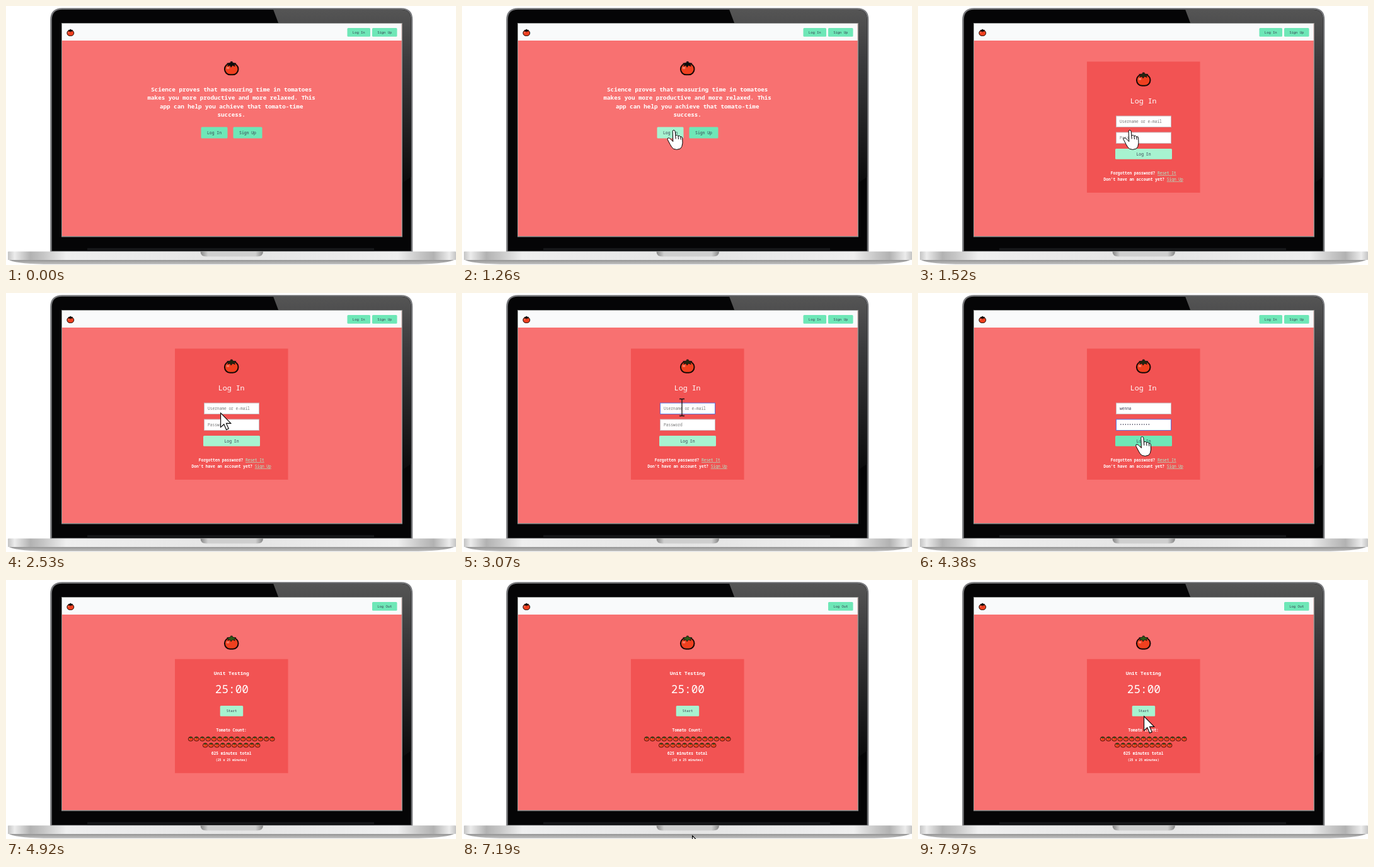
Recreate the animation shown at these times as an HTML page. Size 714 by 412 pixels, loop 8 s.

```html
<!DOCTYPE html>
<html lang="en">
<head>
<meta charset="utf-8">
<title>Tomato timer</title>
<style>
html, body { margin: 0; width: 100%; height: 100%; overflow: hidden; background: #fff; }
svg { display: block; width: 714px; height: 412px; }
text { font-family: "Noto Sans Mono", "DejaVu Sans Mono", monospace; white-space: pre; }
</style>
</head>
<body>
<svg id="stage" viewBox="0 0 714 412"></svg>
<script>
const MINT = '#6ee7b7', PALE = '#a7f3d0', PANEL = '#f25353', MID = 357.7;

const text = (s, x, y, size, fill = '#fff', more = '') =>
  `<text x="${x}" y="${y}" font-size="${size}" fill="${fill}" ${more}>${s}</text>`;
const centered = (s, x, y, size, fill, bold) =>
  text(s, x, y, size, fill, `text-anchor="middle" font-weight="${bold ? 600 : 400}"`);
const rect = (x, y, w, h, fill, more = '') =>
  `<rect x="${x}" y="${y}" width="${w}" height="${h}" fill="${fill}" ${more}/>`;
const button = (s, x, y, w, h, size, fill, id = '') =>
  rect(x, y, w, h, fill, `rx="1.5" ${id && `id="${id}"`}`) +
  centered(s, x + w / 2, y + h / 2 + size * .36, size, '#374151');
const field = (id, y, hint) =>
  rect(314.5, y, 87, 17.5, '#fff', `id="${id}Box" stroke="#c9b4b8"`) +
  text(hint, 320, y + 11, 6.2, '#777', `id="${id}"`);
const group = (id, body) => `<g id="${id}">${body}</g>`;
const gradient = (id, stops, down) =>
  `<linearGradient id="${id}" ${down ? 'x2="0" y2="1"' : ''}>` +
  stops.map(([at, color]) => `<stop offset="${at}" stop-color="${color}"/>`).join('') + '</linearGradient>';

const tomato = (x, y, scale, leaf = '#0c0c0c') => `
  <g transform="translate(${x} ${y}) scale(${scale})">
    <rect x="-10.8" y="-7.4" width="21.6" height="17.6" rx="8.6" fill="#f0401f" stroke="#140805" stroke-width="2"/>
    <ellipse cx="-5.6" cy="-.4" rx="2.4" ry="1.9" fill="#f77a66"/>
    <path d="M-1.2 -10.5H1.4L1.8 -8.4L7.4 -7.8L4.6 -5.6L5.6 -3L1.6 -4.6L-.6 -1.6L-2.4 -4.6L-6 -3.2L-4.6 -5.8L-7 -7.8L-1.6 -8.4Z"
      fill="${leaf}" stroke="#111" stroke-width=".8"/>
  </g>`;
const tomatoRow = (n, y) =>
  Array.from({ length: n }, (_, i) => tomato(MID + (i - (n - 1) / 2) * 9.24, y, .35, '#2f5a16')).join('');

const laptop = `
  <defs>
    ${gradient('rim', [[0, '#77787b'], [.5, '#6c6d70'], [1, '#77787b']])}
    ${gradient('gloss', [[0, '#555'], [.3, '#3b3b3d'], [1, '#0b0b0c']], true)}
    ${gradient('metal', [[0, '#c4c4c4'], [.015, '#ececec'], [.05, '#b2b2b2'], [.08, '#c6c6c6'], [.13, '#efefef'],
      [.5, '#e4e4e4'], [.87, '#efefef'], [.92, '#c6c6c6'], [.95, '#b2b2b2'], [.985, '#ececec'], [1, '#c4c4c4']])}
    ${gradient('under', [[0, '#8d8d8d'], [1, '#c4c4c4']], true)}
    ${gradient('notch', [[0, '#858585'], [.12, '#cfcfcf'], [.88, '#cfcfcf'], [1, '#858585']])}
  </defs>
  <path d="M71.5 391V22Q71.5 4.5 89 4.5H627Q644 4.5 644 22V391Z" fill="#050506" stroke="url(#rim)" stroke-width="2.6"/>
  <path d="M424 5.5L432.5 28H628V282L642.5 272V22Q642.5 6 627 6Z" fill="url(#gloss)"/>
  ${rect(129, 385, 455, 5, '#151618')}
  <path d="M3 403Q12 409.5 60 411H654Q702 409.5 713 403Z" fill="url(#under)"/>
  ${rect(3, 390.5, 711, 13.5, 'url(#metal)', 'rx="1"')}
  <path d="M308.5 390.5H408Q408 398.5 398 398.5H318Q308.5 398.5 308.5 390.5" fill="url(#notch)"/>
  ${rect(88, 27, 541, 340.5, '#8f9391')}
  ${rect(89, 28, 538.6, 338, '#f87171')}
  ${rect(89, 28, 538.6, 27, '#f9fafb')}
  ${tomato(102.3, 42.3, .5)}`;

const pitch = [
  'Science proves that measuring time in tomatoes',
  'makes you more productive and more relaxed. This',
  'app can help you achieve that tomato-time',
  'success.'];

const link = s => `<tspan fill="${PALE}" font-weight="400" text-decoration="underline">${s}</tspan>`;

const landing =
  tomato(MID, 99, 1) +
  pitch.map((s, i) => centered(s, MID, 135.8 + i * 13.5, 9.26, '#fff', true)).join('') +
  button('Log In', 309.5, 192.5, 42, 18, 6.4, MINT, 'enter') +
  button('Sign Up', 360.5, 192.5, 46, 18, 6.4, MINT);

const login =
  rect(268, 88.5, 179.5, 208.5, PANEL) +
  tomato(MID, 116.5, 1, '#24260f') +
  centered('Log In', MID, 155, 11.6) +
  field('user', 175, '') + field('pass', 201, '') +
  button('Log In', 313, 227, 90, 16.7, 6.4, PALE, 'submit') +
  centered('Forgotten password? ' + link('Reset It'), MID, 268, 6.2, '#fff', true) +
  centered("Don't have an account yet? " + link('Sign Up'), MID, 278, 6.2, '#fff', true);

const timer =
  tomato(MID, 99.5, 1, '#2f5a16') +
  rect(268, 125.8, 179.5, 181.4, PANEL) +
  centered('Unit Testing', MID, 151.2, 7.75, '#fff', true) +
  centered('25:00', 358.4, 180, 17.7) +
  button('Start', 339.7, 200, 36.5, 16.7, 5.5, PALE) +
  centered('Tomato Count:', MID, 241.2, 6.2, '#fff', true) +
  tomatoRow(15, 252.6) + tomatoRow(10, 262.6) +
  centered('625 minutes total', MID, 277.8, 6.25, '#fff', true) +
  centered('(25 x 25 minutes)', MID, 288, 4.9, '#fff', true);

const pointers =
  '<circle id="ring" r="17" fill="#fff" fill-opacity=".3" stroke="#fff" stroke-opacity=".6" stroke-width="2"/>' +
  group('arrow', '<path d="M.6 .8V23.6L5.8 18.8L9.6 27.4L13.2 25.8L9.5 17.4H16.8Z" fill="#fff" stroke="#000" stroke-width="1.1"/>') +
  group('beam', '<path d="M-4 -13.5H-1Q0 -13.5 0 -12.5Q0 -13.5 1 -13.5H4M0 -12.5V12.5M-4 13.5H-1Q0 13.5 0 12.5Q0 13.5 1 13.5H4" fill="none" stroke="#111" stroke-width="1.3"/>') +
  group('hand', `<path d="M-2.2 2.4Q-2 .5 -.4 .5T1.8 2.6L2.4 9Q5.6 7.4 6.6 9.8Q9.4 8.6 10.4 11Q13 10.4 13.3 13L13.6 21Q13 27.5 10 30Q4 32.6 -.5 30.4Q-4 28 -6 23.5L-10.2 15.6Q-11 12.4 -8 12.8L-5.6 14.6L-1.6 18.6Z
    M2.4 9L2.8 14.5M6.6 9.8L7 15M10.4 11L10.8 15.6" fill="#fff" stroke="#000" stroke-width="1" stroke-linejoin="round"/>`);

const $ = id => document.getElementById(id);
$('stage').innerHTML = laptop +
  group('guestNav',
    button('Log In', 541.5, 35, 36.5, 13.7, 5.5, MINT) +
    button('Sign Up', 581, 35, 39.5, 13.7, 5.5, MINT)) +
  group('memberNav', button('Log Out', 581, 35, 39.5, 13.7, 5.5, MINT)) +
  group('landing', landing) + group('login', login) + group('timer', timer) + pointers;

// start time, pointer, hot spot
const moves = [
  [0], [660, 'hand', 336.4, 197],
  [2530, 'arrow', 340, 190], [2600, 'beam', 343, 186], [2670, 'beam', 346, 184], [2800, 'beam', 349, 182],
  [3820, 'arrow', 347, 192], [3890, 'arrow', 346, 200], [3960, 'arrow', 348, 207],
  [4030, 'arrow', 350, 214], [4100, 'arrow', 352, 221],
  [4170, 'hand', 355, 225], [4240, 'hand', 356, 228], [4920]];
const clicks = [[1190, 335, 197], [3000, 349, 182], [4310, 356, 228]];

const show = (id, on) => $(id).setAttribute('display', on ? 'inline' : 'none');
const place = (id, x, y) => $(id).setAttribute('transform', `translate(${x} ${y})`);
const fill = (id, color) => $(id).setAttribute('fill', color);

function pointerAt(t) {
  if (t < 7190) return moves.findLast(m => m[0] <= t);
  const p = Math.min(1, Math.floor((t - 7190) / 70.9 + .01) / 11);
  const ease = .5 * p + .25 * (1 - Math.cos(Math.PI * p));
  return [t, 'arrow', 365 - 7 * p - 6 * Math.sin(Math.PI * p), 406 - 190 * ease];
}

function setField(id, value, hint, focused) {
  $(id).textContent = value || hint;
  fill(id, value ? '#3f3f55' : '#777');
  $(id + 'Box').setAttribute('stroke', focused ? '#5b74e0' : '#c9b4b8');
}

function draw(t) {
  show('landing', t < 1520);
  show('login', t >= 1520 && t < 4530);
  show('timer', t >= 4530);
  show('guestNav', t < 4530);
  show('memberNav', t >= 4530);
  fill('enter', t < 660 ? MINT : PALE);
  fill('submit', t < 4170 ? PALE : MINT);

  const key = Math.floor((t - 3330) / 70) + 1;
  setField('user', 'wenna'.slice(0, Math.max(0, key)), 'Username or e-mail', t >= 3000 && key < 6);
  const dots = Math.max(0, Math.min(13, Math.round((key - 5) * 3.3)));
  setField('pass', '•'.repeat(dots), 'Password', key >= 6);

  const [, kind, x, y] = pointerAt(t);
  for (const id of ['arrow', 'beam', 'hand']) {
    show(id, id === kind);
    if (id === kind) place(id, x, y);
  }
  const click = clicks.find(c => t >= c[0] && t < c[0] + 70);
  show('ring', click);
  if (click) place('ring', click[1], click[2]);
}

const start = performance.now();
function frame() {
  draw((performance.now() - start) % 8000);
  requestAnimationFrame(frame);
}
frame();
</script>
</body>
</html>
```
